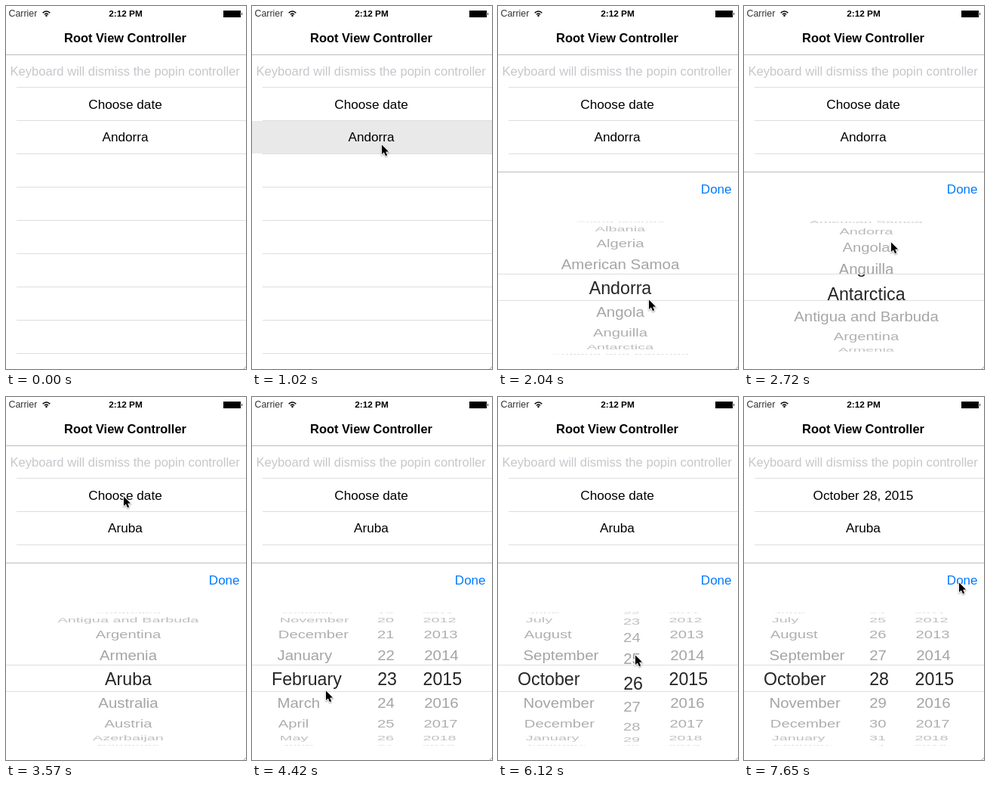
Recreate the animation shown at these times as an HTML page with a canvas. Size 318 px wide and 480 px high, loop 7990 ms.

```html
<!DOCTYPE html>
<html lang="en">
<head>
<meta charset="utf-8">
<title>Root View Controller</title>
<style>
  html, body { margin: 0; width: 100%; height: 100%; overflow: hidden; background: #fff; }
  canvas { display: block; width: 318px; height: 480px; }
</style>
</head>
<body>
<canvas id="stage" width="318" height="480"></canvas>
<script>
const ctx = document.getElementById('stage').getContext('2d');
const W = 318, H = 480, LOOP = 7990, STEP = 170;
const FONT = '"Liberation Sans", Arial, sans-serif';
const LINE = '#dedee0', EDGE = '#bcbcbc';

const COUNTRIES = ['Afghanistan', 'Åland Islands', 'Albania', 'Algeria', 'American Samoa', 'Andorra',
  'Angola', 'Anguilla', 'Antarctica', 'Antigua and Barbuda', 'Argentina', 'Armenia', 'Aruba',
  'Australia', 'Austria', 'Azerbaijan', 'Bahamas', 'Bahrain'];
const MONTHS = ['January', 'February', 'March', 'April', 'May', 'June', 'July', 'August',
  'September', 'October', 'November', 'December'];

const mod = (n, m) => ((n % m) + m) % m;
const country = i => COUNTRIES[i] || '';
const month = i => MONTHS[mod(i, 12)];
const day = i => String(mod(i - 1, 31) + 1);
const year = i => String(i);

// Smooth 0..1 progress between two times.
function ease(t, from, to) {
  const k = Math.min(1, Math.max(0, (t - from) / (to - from)));
  return k * k * (3 - 2 * k);
}

const countryScroll = t => 5 + 2 * ease(t, 2040, 2380) + 5 * ease(t, 2550, 3230);
const monthScroll = t => 1 + 8 * ease(t, 4420, 4930);
const dayScroll = t => 23 + 5 * ease(t, 5560, 6590);

// Pointer stops: when the move begins, when it ends, and where.
const STOPS = [
  { from: 340, to: 680, x: 171, y: 182 },
  { from: 1530, to: 2040, x: 199, y: 387 },
  { from: 2040, to: 2380, x: 197, y: 325 },
  { from: 2550, to: 3570, x: 155, y: 130 },
  { from: 3910, to: 4420, x: 97, y: 387 },
  { from: 4420, to: 4930, x: 93, y: 277 },
  { from: 5100, to: 5780, x: 184, y: 420 },
  { from: 5780, to: 6290, x: 180, y: 312 },
  { from: 6630, to: 7500, x: 284, y: 244 }
];

function text(str, x, y, size, color = '#000', align = 'center', weight = '') {
  ctx.font = `${weight} ${size}px ${FONT}`;
  ctx.fillStyle = color;
  ctx.textAlign = align;
  ctx.fillText(str, x, y);
}

function rect(x, y, w, h, color) {
  ctx.fillStyle = color;
  ctx.fillRect(x, y, w, h);
}

function clipped(y, h, draw) {
  ctx.save();
  ctx.beginPath();
  ctx.rect(0, y, W, h);
  ctx.clip();
  draw();
  ctx.restore();
}

function statusBar() {
  text('Carrier', 3.5, 14, 12.4, '#333', 'left');
  text('2:12 PM', 158.5, 14, 11.8, '#000', 'center', 'bold');
  ctx.strokeStyle = '#000';
  ctx.lineWidth = 1.5;
  for (const r of [3.4, 6.4]) {
    ctx.beginPath();
    ctx.arc(53.5, 13.5, r, -Math.PI * 0.77, -Math.PI * 0.23);
    ctx.stroke();
  }
  ctx.beginPath();
  ctx.arc(53.5, 12.8, 1.3, 0, 7);
  ctx.fillStyle = '#000';
  ctx.fill();
  rect(288, 6, 23, 9, '#000');
  rect(312, 9, 1, 3, '#333');
}

function shade(t, y, on, off) {
  if (t < on) return;
  ctx.globalAlpha = 1 - ease(t, off, off + 2 * STEP);
  rect(0, y, W, 43, '#e9e9e9');
  ctx.globalAlpha = 1;
}

function table(t) {
  text('Root View Controller', 158, 48, 16.4, '#000', 'center', 'bold');
  rect(0, 64, W, 1, EDGE);
  shade(t, 152, 850, 1360);
  shade(t, 108, 3910, 4080);
  for (let y = 107; y < H; y += 44) rect(14, y, W - 14, 1, LINE);
  text('Keyboard will dismiss the popin controller', 5.5, 92, 16.6, '#c7c7cc', 'left');
  text(t < 6800 ? 'Choose date' : 'October 28, 2015', 158, 135.5, 17.2);
  text(t < 3400 ? 'Andorra' : 'Aruba', 158, 179.2, 17.2);
}

// One wheel column; x is the resting edge, bigX the edge inside the magnified band.
function wheel(label, scroll, x, bigX, align) {
  const R = 88, CY = 372.6, ROW = 21 * Math.PI / 180, EYE = 160;
  const rows = big => {
    const mid = Math.round(scroll);
    for (let i = mid - 5; i <= mid + 5; i++) {
      const a = (i - scroll) * ROW, c = Math.cos(a);
      if (Math.abs(a) > 1.54) continue;
      const size = big ? 23.2 : 20.5;
      ctx.save();
      ctx.translate(EYE, CY + Math.sin(a) * R * (big ? 1.13 : 1));
      ctx.scale(0.945 + 0.055 * c, c);
      text(label(i), (big ? bigX : x) - EYE, size * 0.36, size,
        big ? '#262626' : `rgba(0,0,0,${0.16 + 0.21 * c})`, align);
      ctx.restore();
    }
  };
  clipped(270, 84, () => rows(false));
  clipped(390, 84, () => rows(false));
  clipped(355, 34, () => rows(true));
}

function panel(t) {
  if (t < 1020) return;
  const drop = t < 1530 ? Math.round(261 * Math.exp((1020 - t) / 107)) : 0;
  ctx.save();
  ctx.translate(0, drop);
  rect(0, 219, W, H - 219, '#fff');
  rect(0, 219, W, 1, EDGE);
  text('Done', 309.5, 248, 17, '#007aff', 'right');
  if (t < 4080) {
    wheel(country, countryScroll(t), 162, 162, 'center');
  } else {
    wheel(month, monthScroll(t), 33, 26, 'left');
    wheel(day, dayScroll(t), 189, 192, 'right');
    wheel(year, 2015, 228.5, 226.5, 'left');
  }
  rect(0, 354, W, 1, LINE);
  rect(0, 389, W, 1, LINE);
  ctx.restore();
}

function pointer(t) {
  if (t < 340) return;
  let x = 270, y = 440;
  for (const stop of STOPS) {
    const k = ease(t, stop.from, stop.to);
    x += (stop.x - x) * k;
    y += (stop.y - y) * k;
  }
  ctx.save();
  ctx.translate(Math.round(x) + 1, Math.round(y) + 1.5);
  ctx.scale(0.9, 0.9);
  ctx.beginPath();
  for (const [px, py] of [[0, 0], [0, 14], [3.2, 11], [5.6, 16.4], [8, 15.4], [5.7, 10.2], [10, 10]]) {
    ctx.lineTo(px, py);
  }
  ctx.closePath();
  ctx.shadowColor = 'rgba(0,0,0,.4)';
  ctx.shadowBlur = 2;
  ctx.shadowOffsetY = 1;
  ctx.strokeStyle = '#fff';
  ctx.lineWidth = 1.8;
  ctx.stroke();
  ctx.shadowColor = 'transparent';
  ctx.fillStyle = '#000';
  ctx.fill();
  ctx.restore();
}

function grip() {
  ctx.strokeStyle = '#aaa';
  ctx.lineWidth = 1;
  ctx.beginPath();
  ctx.moveTo(315, 480);
  ctx.lineTo(318, 477);
  ctx.stroke();
}

function draw(t) {
  rect(0, 0, W, H, '#fff');
  statusBar();
  table(t);
  panel(t);
  grip();
  pointer(t);
}

const start = performance.now();
function tick() {
  const t = (performance.now() - start) % LOOP;
  draw(Math.floor(t / STEP) * STEP);
  requestAnimationFrame(tick);
}
tick();
</script>
</body>
</html>
```
